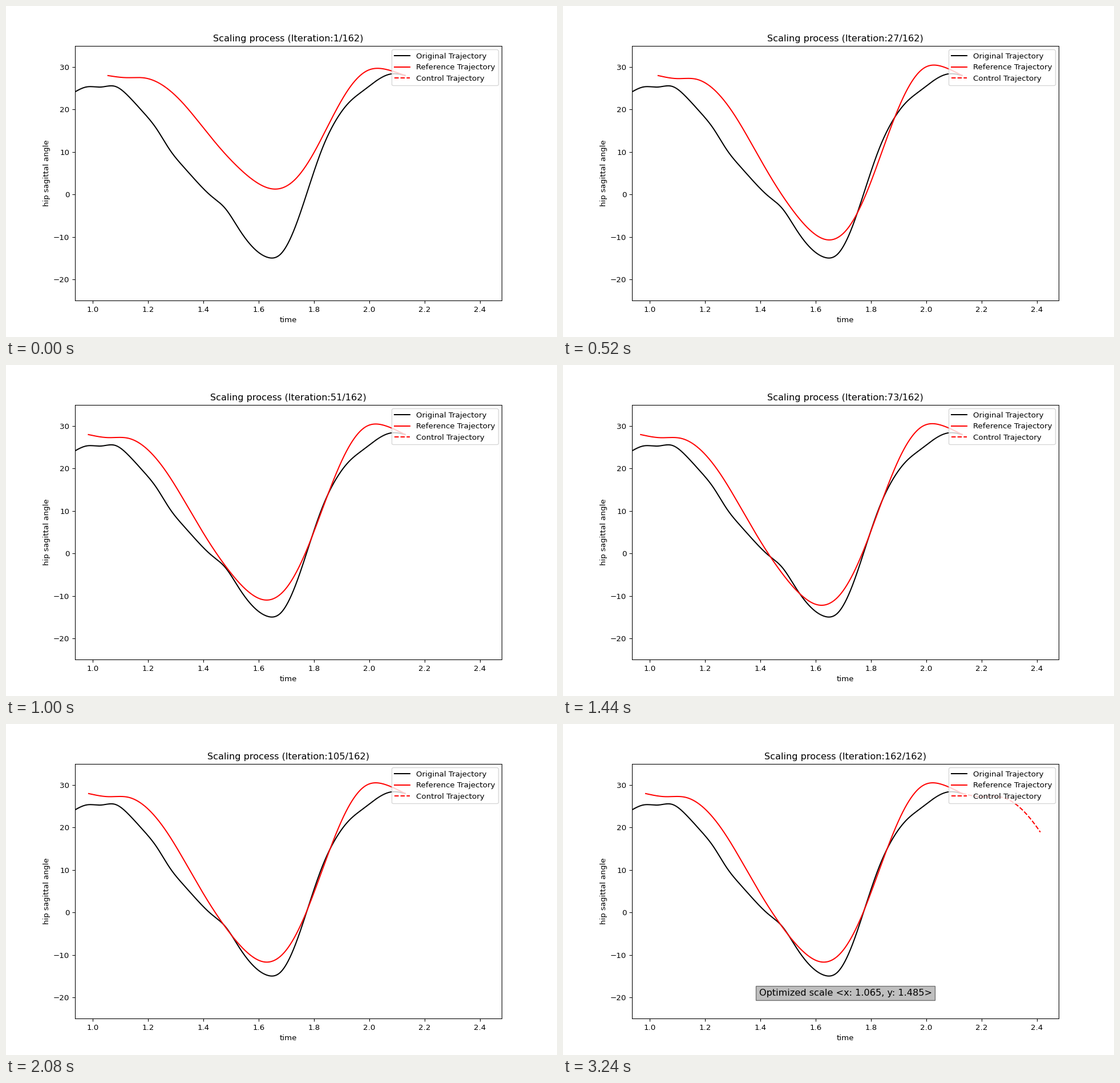
A matplotlib script that plays this animation: 966x580 px, repeating every 4.44 s.

```python
import numpy as np
import matplotlib.pyplot as plt
from matplotlib.animation import FuncAnimation

plt.rcParams["font.family"] = "DejaVu Sans"

TOTAL = 162
FRAMES = 111
END_T = 2.13
CONTROL_SPAN = 0.283

# Hip angle at equal time steps: the measured step and the model cycle
MEASURED = [23.9, 25.32, 25.27, 25.46, 23.1, 19.57, 15.57, 10.42, 6.4, 2.77,
            -0.44, -3.33, -8.23, -12.48, -14.76, -14.05, -8.12, 1.32, 10.72,
            17.47, 21.82, 24.48, 26.92, 28.36, 28.02]
MODEL = [27.97, 27.48, 27.39, 25.53, 21.65, 16.43, 11.08, 6.43, 2.83, 1.25,
         3.2, 9.13, 17.46, 25.05, 29.21, 29.4, 27.97]

# First iteration of each search and the scale (x, y) it settles on
SEARCHES = [(1, (1.0, 1.0)), (2, (1.023, 1.0)), (21, (1.023, 1.458)),
            (40, (1.065, 1.458)), (53, (1.065, 1.491)), (62, (1.081, 1.503)),
            (74, (1.065, 1.503)), (87, (1.065, 1.485))]
SWING, SHRINK = -0.18, -0.618
BEST = SEARCHES[-1][1]


def spline(start, end, y, n=1000):
    """Natural cubic spline through equally spaced values."""
    y = np.array(y)
    last = len(y) - 1
    a, b = np.eye(len(y)), np.zeros(len(y))
    for i in range(1, last):
        a[i, i - 1:i + 2] = 1, 4, 1
        b[i] = 6 * (y[i - 1] - 2 * y[i] + y[i + 1])
    m = np.linalg.solve(a, b)
    u = np.linspace(0, last, n)
    k = np.minimum(u.astype(int), last - 1)
    q = u - k
    p = 1 - q
    v = (p * y[k] + q * y[k + 1]
         + ((p**3 - p) * m[k] + (q**3 - q) * m[k + 1]) / 6)
    return np.linspace(start, end, n), v


def scale_at(iteration):
    """Trials swing around the goal on each axis being searched."""
    i = max(k for k, (first, _) in enumerate(SEARCHES) if first <= iteration)
    first, goal = SEARCHES[i]
    before = SEARCHES[max(i - 1, 0)][1]
    swing = SWING * SHRINK ** (iteration - first)
    return [g + swing * (g != b) for g, b in zip(goal, before)]


model_t, model_v = spline(1.0557, END_T, MODEL)


def scaled(sx, sy):
    end_v = model_v[-1]
    return END_T + sx * (model_t - END_T), end_v + sy * (model_v - end_v)


fig, ax = plt.subplots(figsize=(10, 6.0042), dpi=96.6)
ax.plot(*spline(0.93, END_T, MEASURED), color="black",
        label="Original Trajectory")
reference, = ax.plot([], [], color="red", label="Reference Trajectory")
control, = ax.plot([], [], color="red", ls="--", label="Control Trajectory")
ax.set(xlim=(0.936, 2.48), ylim=(-25, 35), xlabel="time",
       ylabel="hip sagittal angle")
ax.legend(loc="upper right")
title = ax.set_title("")
result = ax.text(0.5, 0.1, "Optimized scale <x: %.3f, y: %.3f>" % BEST,
                 transform=ax.transAxes, ha="center", va="center", fontsize=12,
                 bbox=dict(facecolor="gray", alpha=0.5))


def update(frame):
    iteration = min(2 * frame + 1, TOTAL)
    done = iteration == TOTAL
    t, v = scaled(*scale_at(iteration))
    reference.set_data(t, v)
    ahead = t - t[0] <= CONTROL_SPAN
    control.set_data(t[ahead] - t[0] + END_T, v[ahead])
    control.set_visible(done)
    result.set_visible(done)
    title.set_text(f"Scaling process (Iteration:{iteration}/{TOTAL})")
    return reference, control, result, title


anim = FuncAnimation(fig, update, frames=FRAMES, interval=40, repeat=True)
plt.show()
```
